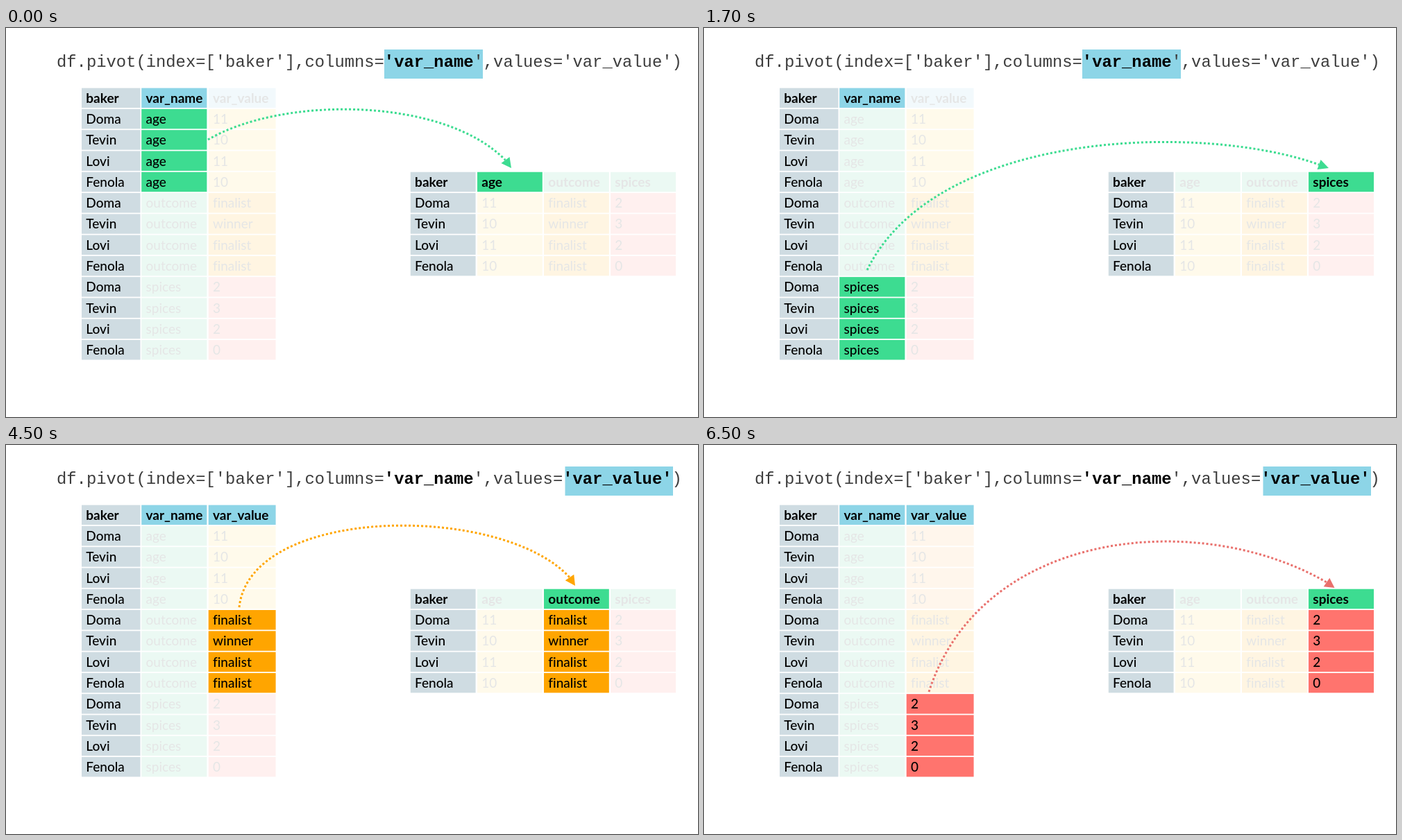
An HTML page with a canvas for the animation above (8000 ms loop, 997x561 px).

```html
<!DOCTYPE html>
<html lang="en">
<head>
<meta charset="utf-8">
<title>Pivot</title>
<style>
html, body { margin: 0; width: 100%; height: 100%; overflow: hidden; background: #fff; }
canvas { display: block; width: 997px; height: 561px; }
</style>
</head>
<body>
<canvas id="stage" width="997" height="561"></canvas>
<script>
const ctx = document.getElementById('stage').getContext('2d');

const LOOP = 8000;
const TOP = 86.6, PITCH = 30.28, CELL_H = 28.5;
const BLUE = '#8dd5e7', INDEX = '#cfdce2', GREEN = '#3ddc91';
const FAINT_GREEN = '#ebf9f3', FAINT_BLUE = '#f2f9fc', FAINT_TEXT = '#e5e6e6';

const bakers = ['Doma', 'Tevin', 'Lovi', 'Fenola'];
const groups = [
  { name: 'age', values: ['11', '10', '11', '10'], full: '#ffd056', faint: '#fffaeb' },
  { name: 'outcome', values: ['finalist', 'winner', 'finalist', 'finalist'], full: '#ffa500', faint: '#fff5e2' },
  { name: 'spices', values: ['2', '3', '2', '0'], full: '#ff746e', faint: '#fff0ef' }
];

const leftCols = [[109, 84.5], [195.2, 94.2], [291.7, 96.9]];
const rightCols = [[582.8, 93.8], [679, 93.8], [775, 93.8], [871, 94]];

// path: cubic control points; tip: arrowhead point
const scenes = [
  { at: 0, group: 0, stage: 'name', color: GREEN,
    path: [291, 161, 398, 98, 630, 99, 719.5, 190.5], tip: [728, 202] },
  { at: 500, group: 2, stage: 'name', color: GREEN,
    path: [235, 349, 335, 145, 720, 137, 886, 197], tip: [900, 202] },
  { at: 2500, group: 0, stage: 'value', color: '#ffd056',
    path: [395, 122, 500, 121, 645, 150, 687.5, 195], tip: [696.5, 205] },
  { at: 4500, group: 1, stage: 'value', color: '#ffa500',
    path: [336, 234, 352, 86, 715, 84, 812, 191], tip: [820, 203] },
  { at: 6500, group: 2, stage: 'value', color: '#e9706c',
    path: [324, 356, 400, 120, 715, 92, 897, 198], tip: [908.5, 206] }
];

function cell([x, w], row, text, fill, lit, bold) {
  const y = TOP + row * PITCH;
  const weight = bold ? 700 : lit ? 500 : 400;
  ctx.fillStyle = fill;
  ctx.fillRect(x, y, w, CELL_H);
  ctx.fillStyle = lit ? '#000' : FAINT_TEXT;
  ctx.font = `${weight} 19px Lato, sans-serif`;
  ctx.letterSpacing = '0.01px'; // keeps "fi" unligated
  ctx.fillText(text, x + 6.3, y + 21.2);
}

function drawCode(byValue) {
  const size = 23.83, step = size * 0.6;
  let x = 73;
  const put = (text, bold) => {
    ctx.font = `${bold ? 'bold' : 'normal'} ${size}px "Liberation Mono", "Courier New", monospace`;
    ctx.fillStyle = bold ? '#000' : '#3c3c3c';
    ctx.fillText(text, x, 56);
    x += text.length * step;
  };
  ctx.letterSpacing = '0px';
  ctx.fillStyle = BLUE;
  if (byValue) ctx.fillRect(805.5, 31, 155.5, 42);
  else ctx.fillRect(545, 31, 142, 42);
  put("df.pivot(index=['baker'],columns=");
  put("'var_name", true);
  put("',values=");
  put("'var_value'", byValue);
  put(')');
}

function drawLeft(scene, byValue) {
  cell(leftCols[0], 0, 'baker', INDEX, true, true);
  cell(leftCols[1], 0, 'var_name', BLUE, true, true);
  cell(leftCols[2], 0, 'var_value', byValue ? BLUE : FAINT_BLUE, byValue, true);
  groups.forEach((group, g) => {
    const active = g === scene.group;
    const nameLit = active && !byValue, valueLit = active && byValue;
    const faint = g === 0 && byValue && scene.group === 2 ? '#fff6ec' : group.faint;
    bakers.forEach((baker, i) => {
      const row = 1 + g * 4 + i;
      cell(leftCols[0], row, baker, INDEX, true);
      cell(leftCols[1], row, group.name, nameLit ? GREEN : FAINT_GREEN, nameLit);
      cell(leftCols[2], row, group.values[i], valueLit ? group.full : faint, valueLit);
    });
  });
}

function drawRight(scene, byValue) {
  cell(rightCols[0], 4, 'baker', INDEX, true, true);
  bakers.forEach((baker, i) => cell(rightCols[0], 5 + i, baker, INDEX, true));
  groups.forEach((group, g) => {
    const active = g === scene.group, lit = active && byValue;
    cell(rightCols[g + 1], 4, group.name, active ? GREEN : FAINT_GREEN, active, true);
    group.values.forEach((value, i) =>
      cell(rightCols[g + 1], 5 + i, value, lit ? group.full : group.faint, lit));
  });
}

function drawArrow({ path, tip, color }) {
  const [x0, y0, ...rest] = path;
  const [bx, by] = path.slice(-2);
  ctx.strokeStyle = ctx.fillStyle = color;
  ctx.lineWidth = 3;
  ctx.setLineDash([3, 3]);
  ctx.beginPath();
  ctx.moveTo(x0, y0);
  ctx.bezierCurveTo(...rest);
  ctx.stroke();

  const dx = tip[0] - bx, dy = tip[1] - by;
  const k = 7.5 / Math.hypot(dx, dy);
  ctx.beginPath();
  ctx.moveTo(...tip);
  ctx.lineTo(bx - dy * k, by + dx * k);
  ctx.lineTo(bx + dy * k, by - dx * k);
  ctx.fill();
}

function draw(now) {
  const t = now % LOOP;
  const scene = scenes.filter(s => s.at <= t).pop();
  const byValue = scene.stage === 'value';
  ctx.fillStyle = '#fff';
  ctx.fillRect(0, 0, 997, 561);
  drawCode(byValue);
  drawLeft(scene, byValue);
  drawRight(scene, byValue);
  drawArrow(scene);
}

let start;
function tick(now) {
  start ??= now;
  draw(Math.max(0, now - start));
  requestAnimationFrame(tick);
}
draw(0);
requestAnimationFrame(tick);
</script>
</body>
</html>
```
